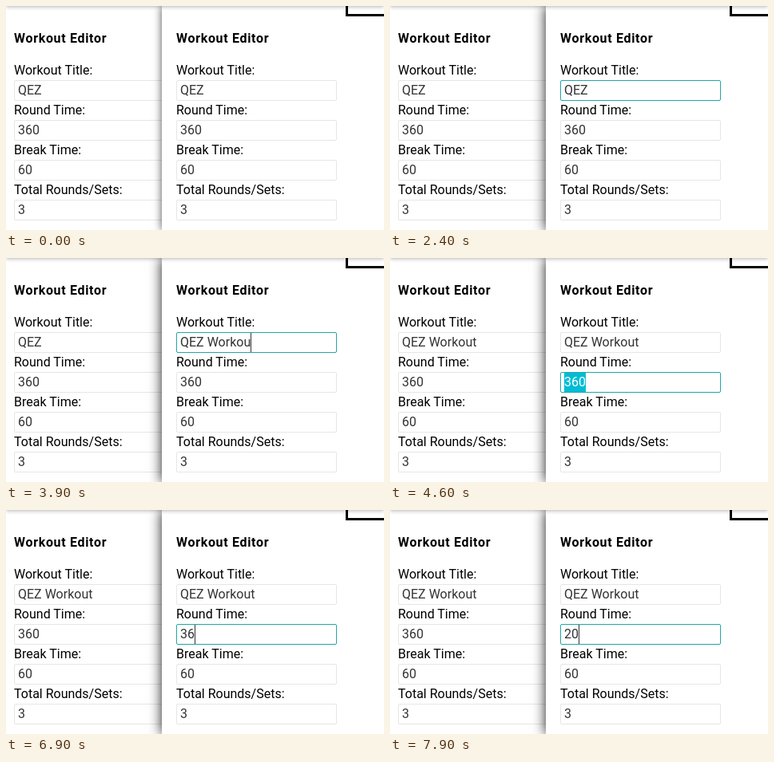
Write an HTML page that moves like this. It is 473x281 px and loops after 8 s.

```html
<!DOCTYPE html>
<html lang="en">
<head>
<meta charset="utf-8">
<title>Workout Editor</title>
<style>
  html, body { margin: 0; width: 100%; height: 100%; overflow: hidden; background: #fff; }
  #stage {
    position: relative; width: 473px; height: 281px; overflow: hidden;
    background: #fff; color: #000; font: 16px/20px Roboto, sans-serif;
  }
  #stage div { position: absolute; box-sizing: border-box; white-space: pre; }
  .list { left: 0; top: 0; width: 195px; height: 281px; overflow: hidden; }
  .panel { left: 195px; top: 0; width: 278px; height: 281px; background: #fff; }
  .title { top: 31px; font-weight: 700; letter-spacing: .67px; }
  .field {
    width: 201px; height: 26px; padding: 0 4px; line-height: 24px;
    border: 1px solid #e6e6e6; border-radius: 2px; color: #333; background: #fff;
  }
  .field.focus { border-color: #22a6a6; }
  .selected { display: inline-block; height: 24px; background: #00bcd4; color: #fff; }
  .caret { display: inline-block; width: 1px; height: 24px; margin-right: -1px; background: #333; vertical-align: top; }
  .hint { color: #999; }
  .popup {
    left: 18px; width: 201px; padding: 2px 0; background: #fff;
    border: 1px solid #ccc; box-shadow: 0 1px 4px rgba(0, 0, 0, .2);
  }
  .popup span { display: block; padding-left: 5px; font-size: 13px; line-height: 20px; }
  .box { left: 230px; top: -30px; width: 80px; height: 43px; border: 3px solid #000; }
  .topbar { left: 0; top: -10px; width: 473px; height: 10px; box-shadow: 0 1px 5px rgba(0, 0, 0, .3); }
</style>
</head>
<body>
<div id="stage"></div>
<script>
const LOOP = 8000;
const NAME = "QEZ";
const FULL = NAME + " Workout";
const LABELS = ["Workout Title:", "Round Time:", "Break Time:", "Total Rounds/Sets:"];
const stage = document.getElementById("stage");

function add(parent, cls, text = "", left, top) {
  const el = document.createElement("div");
  el.className = cls;
  el.textContent = text;
  if (left !== undefined) el.style.left = left + "px";
  if (top !== undefined) el.style.top = top + "px";
  parent.append(el);
  return el;
}

function buildForm(parent, x) {
  add(parent, "title", "Workout Editor", x);
  return LABELS.map((label, i) => {
    add(parent, "label", label, x, 71 + 50 * i);
    return add(parent, "field", ["", "360", "60", "3"][i], x, 93 + 50 * i);
  });
}

const saved = buildForm(add(stage, "list"), 10);
const panel = add(stage, "panel");
const fields = buildForm(panel, 18);
add(panel, "box");
const popup = add(panel, "popup");
add(stage, "topbar");

// Each step: start time, text, and caret / select state
const titleSteps = [
  [0, NAME], [1300, NAME, "caret"], [2400, NAME, "idle"], [2600, NAME + " ", "caret"],
  [2900, NAME + " W", "caret"], [3200, NAME + " Wo", "caret"], [3300, NAME + " Wor", "caret"],
  [3400, NAME + " Work", "caret"], [3600, NAME + " Work", "idle"], [3700, NAME + " Worko", "caret"],
  [3900, NAME + " Workou", "caret"], [4000, FULL, "caret"], [4600, FULL]
];
const roundSteps = [
  [0, "360"], [4600, "360", "select"], [6000, "360", "caret"], [6900, "36", "caret"],
  [7100, "3", "caret"], [7400, "", "caret"], [7600, "2", "caret"], [7800, "20", "caret"]
];
// Start, full, fade, end, top, height, rows
const popups = [
  [2600, 2700, 2900, 3000, 119, 127, ["", " 1", " 2", " 3", " 4", " 5"].map(n => FULL + n)],
  [7100, 7200, 7400, 7400, 169, 28, ["360"]],
  [7600, 7600, 7800, 7900, 169, 68, ["20", "200", "240"]]
];

const current = (steps, t) => steps.filter(s => s[0] <= t).pop();

function span(cls, text) {
  const el = document.createElement("span");
  el.className = cls;
  el.textContent = text;
  return el;
}

function showField(el, [, text, state], hint = "") {
  el.classList.toggle("focus", !!state);
  const parts = [state === "select" ? span("selected", text) : text];
  if (state === "caret") parts.push(span("caret", ""));
  if (!text) parts.push(span("hint", hint));
  el.replaceChildren(...parts);
}

function showPopup(t) {
  const p = popups.find(p => t >= p[0] && t < p[3]);
  popup.style.display = p ? "block" : "none";
  if (!p) return;
  const [, full, fade, , top, height, rows] = p;
  popup.style.opacity = t < full || t >= fade ? .5 : 1;
  popup.style.top = top + "px";
  popup.style.height = height + "px";
  popup.replaceChildren(...rows.map(r => span("", r)));
}

function draw(t) {
  panel.style.boxShadow = t < 1100 ? "0 0 10px rgba(0, 0, 0, .7)" : "0 0 15px rgba(0, 0, 0, .9)";
  saved[0].textContent = t < 4600 ? NAME : FULL;
  showField(fields[0], current(titleSteps, t));
  showField(fields[1], current(roundSteps, t), "roundTime");
  showPopup(t);
}

let last = -1;
const start = performance.now();
function tick() {
  const t = Math.floor(((performance.now() - start) % LOOP) / 100) * 100;
  if (t !== last) draw(last = t);
  requestAnimationFrame(tick);
}
tick();
</script>
</body>
</html>
```
